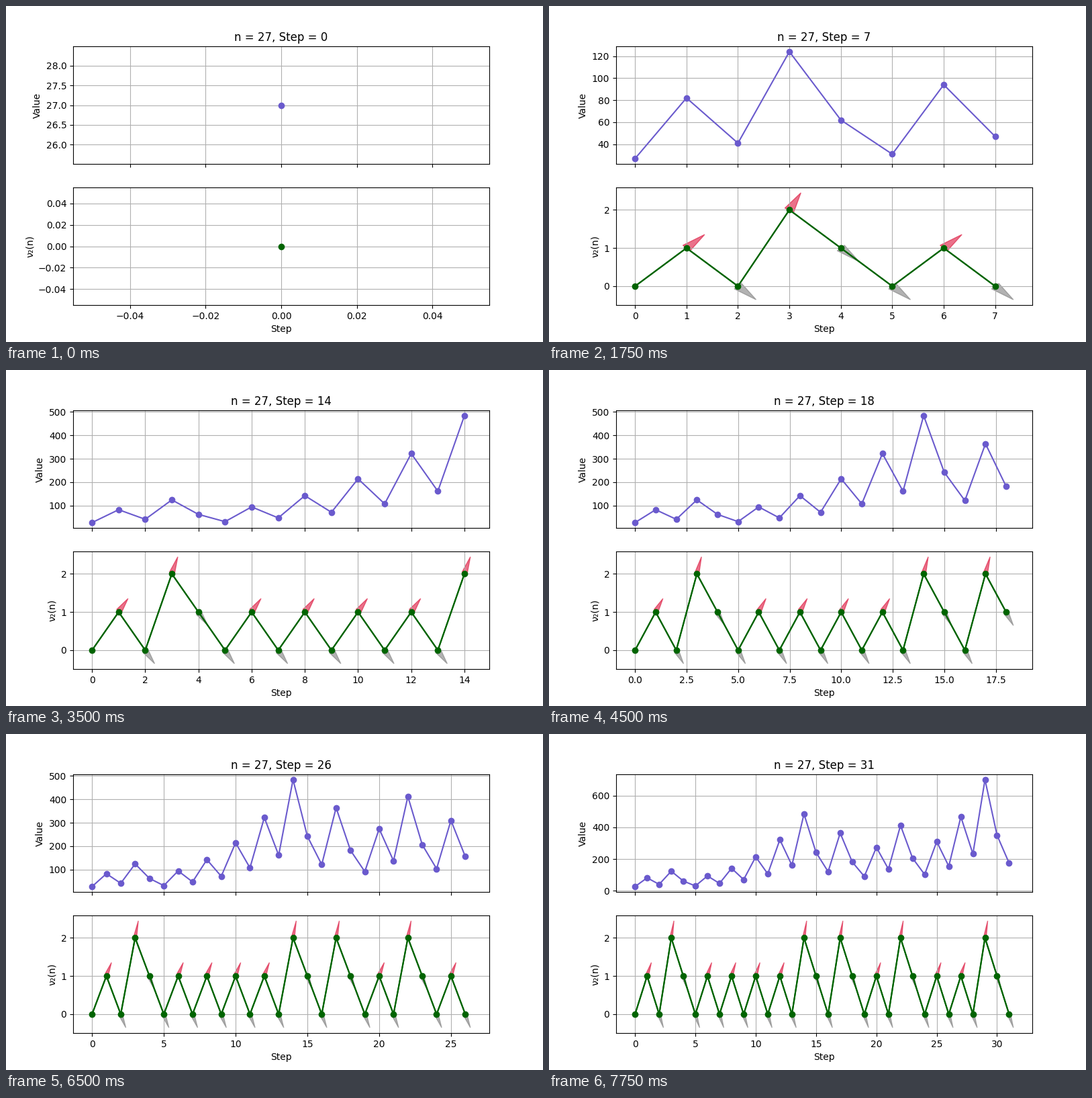
A matplotlib script that plays this animation: 800x500 px, repeating every 8000 ms.

```python
import numpy as np
import matplotlib.pyplot as plt
from matplotlib.animation import FuncAnimation

START = 27
FRAMES = 32
INTERVAL = 250
ARROW_LENGTH = 0.5
ARROW_HALF_WIDTH = 0.1


def collatz(n, count):
    seq = [n]
    while len(seq) < count:
        n = n // 2 if n % 2 == 0 else 3 * n + 1
        seq.append(n)
    return seq


def two_adic(n):
    """Exponent of 2 in n."""
    return (n & -n).bit_length() - 1


values = collatz(START, FRAMES)
valuations = [two_adic(v) for v in values]

fig = plt.figure(figsize=(8, 5), dpi=100)


def draw_arrow(ax, start, end):
    """Triangle at the end point, aimed along the segment."""
    start, end = np.array(start, float), np.array(end, float)
    along = (end - start) / np.linalg.norm(end - start)
    across = ARROW_HALF_WIDTH * np.array([-along[1], along[0]])
    corners = np.array([end + ARROW_LENGTH * along, end + across, end - across])
    color = "crimson" if end[1] > start[1] else "gray"
    ax.fill(corners[:, 0], corners[:, 1], color=color, alpha=0.6)


def update(step):
    fig.clear()
    top, bottom = fig.subplots(2, 1, sharex=True)
    steps = range(step + 1)

    top.plot(steps, values[:step + 1], "o-", color="slateblue")
    top.set_title(f"n = {START}, Step = {step}")
    top.set_ylabel("Value")
    top.grid(True)

    bottom.plot(steps, valuations[:step + 1], "o-", color="darkgreen")
    for i in range(1, step + 1):
        start, end = (i - 1, valuations[i - 1]), (i, valuations[i])
        bottom.plot(*zip(start, end), color="darkgreen")
        draw_arrow(bottom, start, end)
    bottom.set_ylabel("ν₂(n)")
    bottom.set_xlabel("Step")
    bottom.grid(True)
    return []


anim = FuncAnimation(fig, update, frames=FRAMES, init_func=lambda: update(0),
                     interval=INTERVAL, repeat=True, repeat_delay=0, blit=False)
plt.show()
```
